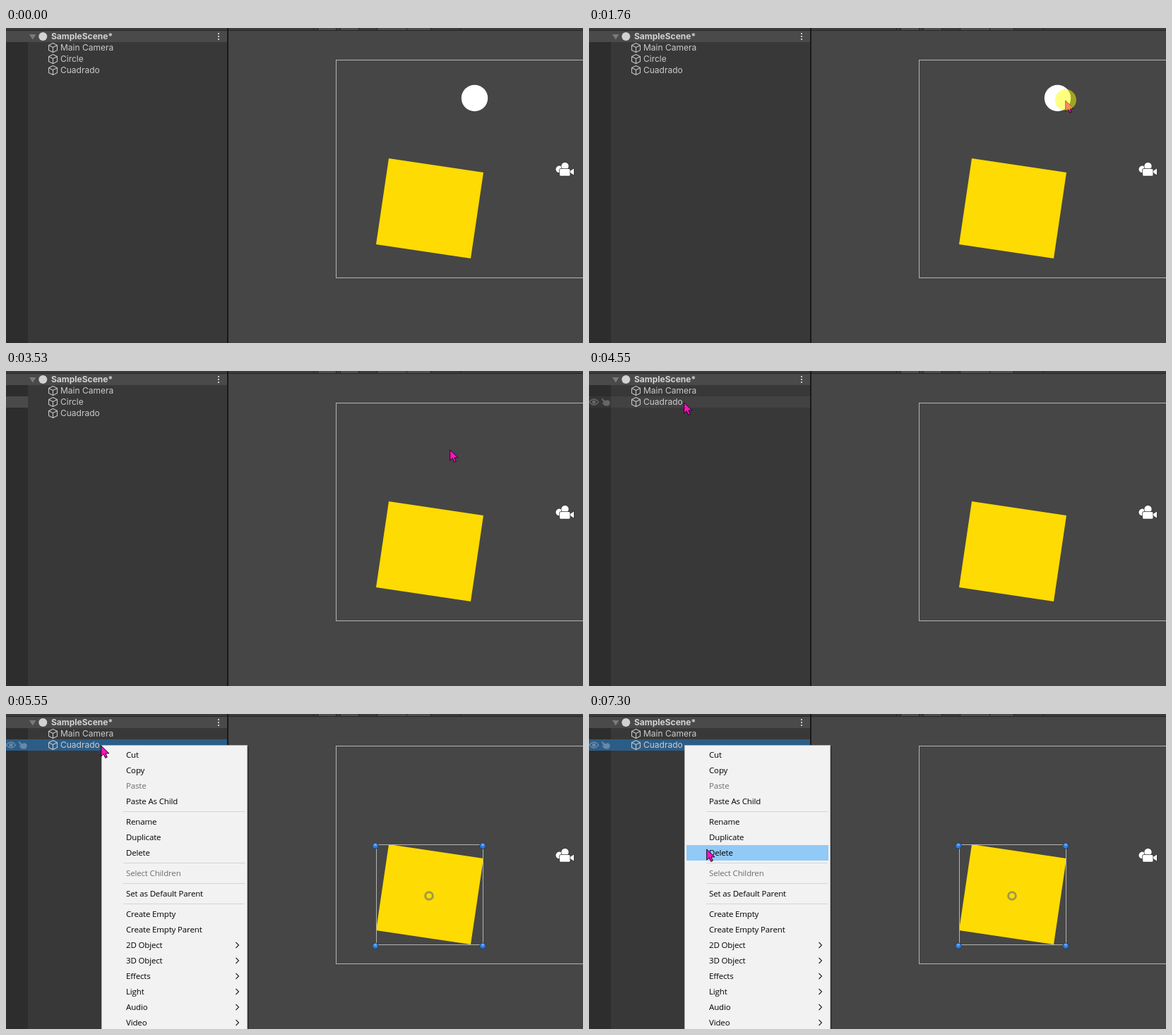
Write an HTML page that moves like this. It is 817 px wide and 447 px high and loops after 8 s.

```html
<!DOCTYPE html>
<html lang="en">
<head>
<meta charset="utf-8">
<title>Scene editor</title>
<style>
  html, body { margin: 0; width: 100%; height: 100%; overflow: hidden; background: #464646; }
  svg { display: block; width: 817px; height: 447px; }

  .list { font: 12px Inter, sans-serif; fill: #cacaca; }
  .title { font-weight: 700; fill: #d2d2d2; }
  .items { font: 11.5px "Open Sans", sans-serif; letter-spacing: -.15px; fill: #000; }
  .off { fill: #6d6d6d; }
  .line { fill: none; stroke: #b4b4b4; }
  .crisp { shape-rendering: crispEdges; }

  /* Hard cuts on one shared 8 s clock; 1% = 80 ms */
  .timed { animation: 8s step-end infinite; }
  .hidden { opacity: 0; }

  .cursor { animation-name: move, appear; }
  @keyframes move {
    0%, 9.5% { transform: translate(413px, 347px); }
    12.625% { transform: translate(170px, 97px); }
    15.75% { transform: translate(215px, 40px); }
    18.875% { transform: translate(669px, 108px); }
    22% { transform: translate(674px, 102px); }
    37.625% { transform: translate(668px, 102px); }
    41% { transform: translate(663px, 102px); }
    44.125% { transform: translate(628px, 111px); }
    47.5% { transform: translate(449px, 104px); }
    50.625% { transform: translate(185px, 50px); }
    53.75% { transform: translate(148px, 44px); }
    56.875% { transform: translate(134px, 44px); }
    81.875% { transform: translate(158px, 54px); }
    85% { transform: translate(175px, 132px); }
    88.125% { transform: translate(172px, 178px); }
    91.25%, 100% { transform: translate(166px, 191px); }
  }
  @keyframes appear { 9.5%, 100% { opacity: 1; } }

  .ball { animation-name: ball; }
  @keyframes ball { 44.125%, 100% { opacity: 0; } }

  .ball-row { animation-name: ball-row; }
  @keyframes ball-row { 47.5%, 100% { opacity: 0; } }

  .box-row { animation-name: box-row; }
  @keyframes box-row { 47.5%, 100% { transform: translateY(-16px); } }

  .ball-picked { animation-name: ball-picked; }
  @keyframes ball-picked { 25.125% { opacity: 1; } 44.125%, 100% { opacity: 0; } }

  .gutter-picked { animation-name: gutter-picked; }
  @keyframes gutter-picked { 25.125% { opacity: 1; } 50.625%, 100% { opacity: 0; } }

  .hover { animation-name: hover; }
  @keyframes hover { 50.625% { opacity: 1; } 60%, 100% { opacity: 0; } }

  .icons { animation-name: icons, tint; color: #666; }
  @keyframes icons {
    15.75% { opacity: 1; }
    18.875% { opacity: 0; }
    50.625%, 100% { opacity: 1; }
  }
  @keyframes tint { 60%, 100% { color: #6888a5; } }

  .box-picked { animation-name: box-picked; }
  @keyframes box-picked { 60%, 100% { opacity: 1; } }

  .click { animation-name: click; }
  @keyframes click {
    0%, 22% { opacity: .5; transform: translate(675px, 102px); }
    0% { opacity: 0; }
    25.125% { opacity: 0; transform: translate(135px, 44px); }
    66.25% { opacity: .5; transform: translate(135px, 44px); }
    69.375%, 100% { opacity: 0; transform: translate(135px, 44px); }
  }

  .menu { animation-name: menu; }
  @keyframes menu { 69.375%, 100% { opacity: 1; } }

  .mark { animation-name: mark; }
  @keyframes mark {
    81.875% { opacity: 1; transform: translateY(47px); }
    85% { opacity: 1; transform: translateY(113px); }
    88.125% { opacity: 1; transform: translateY(164px); }
    91.25%, 100% { opacity: 1; transform: translateY(186px); }
  }
</style>
</head>
<body>
<svg viewBox="0 0 817 447">
  <defs>
    <g id="cube" fill="none" stroke="#c4c4c4" stroke-width="1.1" stroke-linejoin="round">
      <path d="M0-6.5L6-3.5V3.5L0 6.5L-6 3.5V-3.5ZM-6-3.5L0-.5L6-3.5M0-.5V6.5"/>
    </g>
    <g id="knob">
      <circle r="4.6" fill="#1d3556"/>
      <circle r="3.8" fill="#2f79da"/>
      <circle cy="-1.4" r="1.9" fill="#6ba6ee"/>
    </g>
  </defs>

  <!-- Scene view -->
  <rect width="817" height="447" fill="#464646"/>
  <g class="crisp">
    <rect x="315" width="502" height="3" fill="#3c3c3c"/>
    <path fill="#4d4d4d" d="M442 0h25v3h-25zM474 0h25v3h-25zM526 0h41v3h-41zM568 0h33v3h-33z"/>
    <path fill="#262626" d="M435 0h1v3h-1zM441 0h1v3h-1zM467 0h1v3h-1zM473 0h1v3h-1zM499 0h1v3h-1zM525 0h1v3h-1zM567 0h1v3h-1zM601 0h1v3h-1zM643 0h1v3h-1zM315 3h502v1h-502z"/>
    <rect class="line" x="467.5" y="45.5" width="360" height="309"/>
  </g>

  <circle class="timed ball" cx="663.5" cy="99.5" r="18.7" fill="#fff"/>
  <path fill="#fedb02" d="M542 185L676 205L658 327L524 307Z"/>

  <g fill="#fff" stroke="#333" stroke-width="1.4" paint-order="stroke">
    <circle cx="783.5" cy="200.5" r="5"/>
    <circle cx="791.5" cy="196" r="5.2"/>
    <path d="M797 204L804 199.5V208.5Z"/>
    <rect x="784" y="200" width="14.5" height="9.7" rx="1.5"/>
  </g>

  <g class="timed hidden ball-picked">
    <rect class="line crisp" x="645.5" y="80.5" width="37" height="38"/>
    <circle cx="663" cy="102" r="5" fill="none" stroke="#a9bbdb" stroke-width="3"/>
    <use href="#knob" x="644" y="83"/>
    <use href="#knob" x="681" y="83"/>
    <use href="#knob" x="644" y="121"/>
    <use href="#knob" x="681" y="121"/>
  </g>

  <g class="timed hidden box-picked">
    <rect class="line crisp" x="524.5" y="185.5" width="151" height="142"/>
    <circle cx="599" cy="258" r="5.3" fill="none" stroke="#a09a48" stroke-width="3"/>
    <use href="#knob" x="523" y="187"/>
    <use href="#knob" x="675" y="187"/>
    <use href="#knob" x="523" y="329"/>
    <use href="#knob" x="675" y="329"/>
  </g>

  <!-- Hierarchy panel -->
  <g class="crisp">
    <rect width="313" height="447" fill="#383838"/>
    <rect width="31" height="447" fill="#2d2d2d"/>
    <rect width="313" height="3" fill="#3c3c3c"/>
    <rect y="3" width="313" height="1" fill="#262626"/>
    <rect y="4" width="313" height="16" fill="#4a4a4a"/>
    <rect x="313" width="2" height="447" fill="#191919"/>
    <rect class="timed hidden gutter-picked" y="36" width="31" height="16" fill="#4a4a4a"/>
    <rect class="timed hidden ball-picked" x="31" y="36" width="282" height="16" fill="#4d4d4d"/>
    <g class="timed hidden hover">
      <rect y="36" width="31" height="16" fill="#363636"/>
      <rect x="31" y="36" width="282" height="16" fill="#424242"/>
    </g>
    <rect class="timed hidden box-picked" y="36" width="313" height="16" fill="#2c5d87"/>
  </g>

  <g class="timed hidden icons">
    <path d="M.5 44Q7 36 13.5 44Q7 52 .5 44Z" fill="none" stroke="currentColor" stroke-width="1.4"/>
    <circle cx="7" cy="44" r="2.6" fill="currentColor"/>
    <path d="M17.5 39.5L19 38.7L22 42L27 41.3L29.5 43V47L27.5 49.5H22.5L18.5 46L19.5 45L21 45.5Z" fill="currentColor"/>
  </g>

  <g class="list">
    <path d="M33 9H42.5L37.8 16.5Z" fill="#7a7a7a"/>
    <circle cx="52.3" cy="12" r="6" fill="#d2d2d2"/>
    <text class="title" x="64" y="16">SampleScene*</text>
    <path d="M300 7h2v2h-2zM300 11h2v2h-2zM300 15h2v2h-2z"/>
    <use href="#cube" x="66.5" y="28"/>
    <text x="77" y="32">Main Camera</text>
    <g class="timed ball-row">
      <use href="#cube" x="66.5" y="44"/>
      <text x="77" y="48">Circle</text>
    </g>
    <g class="timed box-row">
      <use href="#cube" x="66.5" y="60"/>
      <text x="77" y="64">Cuadrado</text>
    </g>
  </g>

  <!-- Context menu -->
  <g class="timed hidden menu">
    <rect x="137" y="46" width="207" height="410" fill="#000" opacity=".25"/>
    <rect class="crisp" x="135.5" y="44.5" width="206" height="410" fill="#f2f2f2" stroke="#b5b5b5"/>
    <rect class="timed hidden mark" x="138" width="201" height="22" fill="#91c9f7"/>
    <path class="crisp" d="M166 138.5H338M166 211.5H338M166 240.5H338M166 269.5H338" stroke="#d4d4d4"/>
    <text class="items">
      <tspan x="170" y="62">Cut</tspan>
      <tspan x="170" y="84">Copy</tspan>
      <tspan x="170" y="106" class="off">Paste</tspan>
      <tspan x="170" y="128">Paste As Child</tspan>
      <tspan x="170" y="157">Rename</tspan>
      <tspan x="170" y="179">Duplicate</tspan>
      <tspan x="170" y="201">Delete</tspan>
      <tspan x="170" y="230" class="off">Select Children</tspan>
      <tspan x="170" y="259">Set as Default Parent</tspan>
      <tspan x="170" y="288">Create Empty</tspan>
      <tspan x="170" y="310">Create Empty Parent</tspan>
      <tspan x="170" y="332">2D Object</tspan>
      <tspan x="170" y="354">3D Object</tspan>
      <tspan x="170" y="376">Effects</tspan>
      <tspan x="170" y="398">Light</tspan>
      <tspan x="170" y="420">Audio</tspan>
      <tspan x="170" y="442">Video</tspan>
    </text>
    <path d="M325.5 324l4 4-4 4m0 14l4 4-4 4m0 14l4 4-4 4m0 14l4 4-4 4m0 14l4 4-4 4m0 14l4 4-4 4" fill="none" stroke="#222" stroke-width="1.1"/>
  </g>

  <path class="timed hidden cursor" d="M.7 1V16.2L4.2 12.8L6.7 18.4L9.3 17.2L6.9 11.9H12Z" fill="#ff12c0" stroke="#1a0a16"/>
  <circle class="timed hidden click" r="15" fill="#ff0"/>
</svg>
</body>
</html>
```
